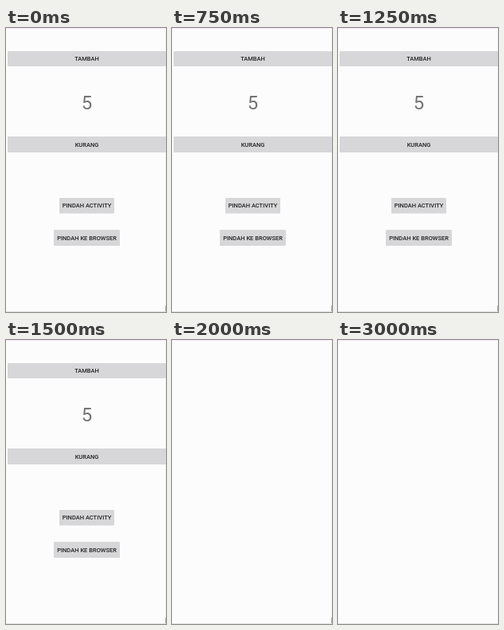
An HTML page that plays this animation: 201 by 356 pixels, repeating every 3.25 s.

```html
<!DOCTYPE html>
<html lang="id">
<head>
<meta charset="utf-8">
<title>Counter screen</title>
<style>
  html, body { margin: 0; width: 100%; height: 100%; overflow: hidden; background: #fcfcfd; }
  svg { display: block; width: 100%; height: 100%; }
  text { font-family: Roboto, Arial, sans-serif; text-anchor: middle; }
  .label { font-size: 7.5px; font-weight: 500; fill: #222; }
  .count { font-size: 24px; fill: #757575; }
  .button { fill: #d7d7d9; }
</style>
</head>
<body>
<svg viewBox="0 0 201 356" preserveAspectRatio="none">
  <rect width="201" height="356" fill="#fcfcfd"/>
  <rect width="201" height="1" fill="#fbe6f8"/>
  <rect x="200" y="1" width="1" height="354" fill="#fdfbd8"/>
  <rect y="355" width="201" height="1" fill="#e4e2e6"/>
  <g id="screen">
    <text class="count" x="101.5" y="102">5</text>
  </g>
  <rect id="corner" x="200" y="348" width="1" height="7" fill="#b5ad70"/>
</svg>
<script>
  const LOOP = 3250;
  const LEAVE = 1750;
  const CORNER_END = 2250;
  const NS = "http://www.w3.org/2000/svg";
  const screen = document.getElementById("screen");
  const corner = document.getElementById("corner");

  function add(tag, attrs, content = "") {
    const el = document.createElementNS(NS, tag);
    for (const key in attrs) el.setAttribute(key, attrs[key]);
    el.textContent = content;
    screen.append(el);
  }

  function addButton(label, x, y, width, height) {
    add("rect", { class: "button", x, y, width, height, rx: 0.7 });
    add("text", { class: "label", x: x + width / 2, y: y + height / 2 + 2.5 }, label);
  }

  addButton("TAMBAH", 2, 29, 199, 19);
  addButton("KURANG", 2, 136, 199, 20);
  addButton("PINDAH ACTIVITY", 67, 213, 69, 19.5);
  addButton("PINDAH KE BROWSER", 60, 253, 83, 20);

  function show(el, on) {
    el.setAttribute("visibility", on ? "visible" : "hidden");
  }

  function draw(time) {
    const t = time % LOOP;
    show(screen, t < LEAVE);
    show(corner, t < CORNER_END);
  }

  const start = performance.now();
  function tick() {
    draw(performance.now() - start);
    requestAnimationFrame(tick);
  }
  tick();
</script>
</body>
</html>
```
